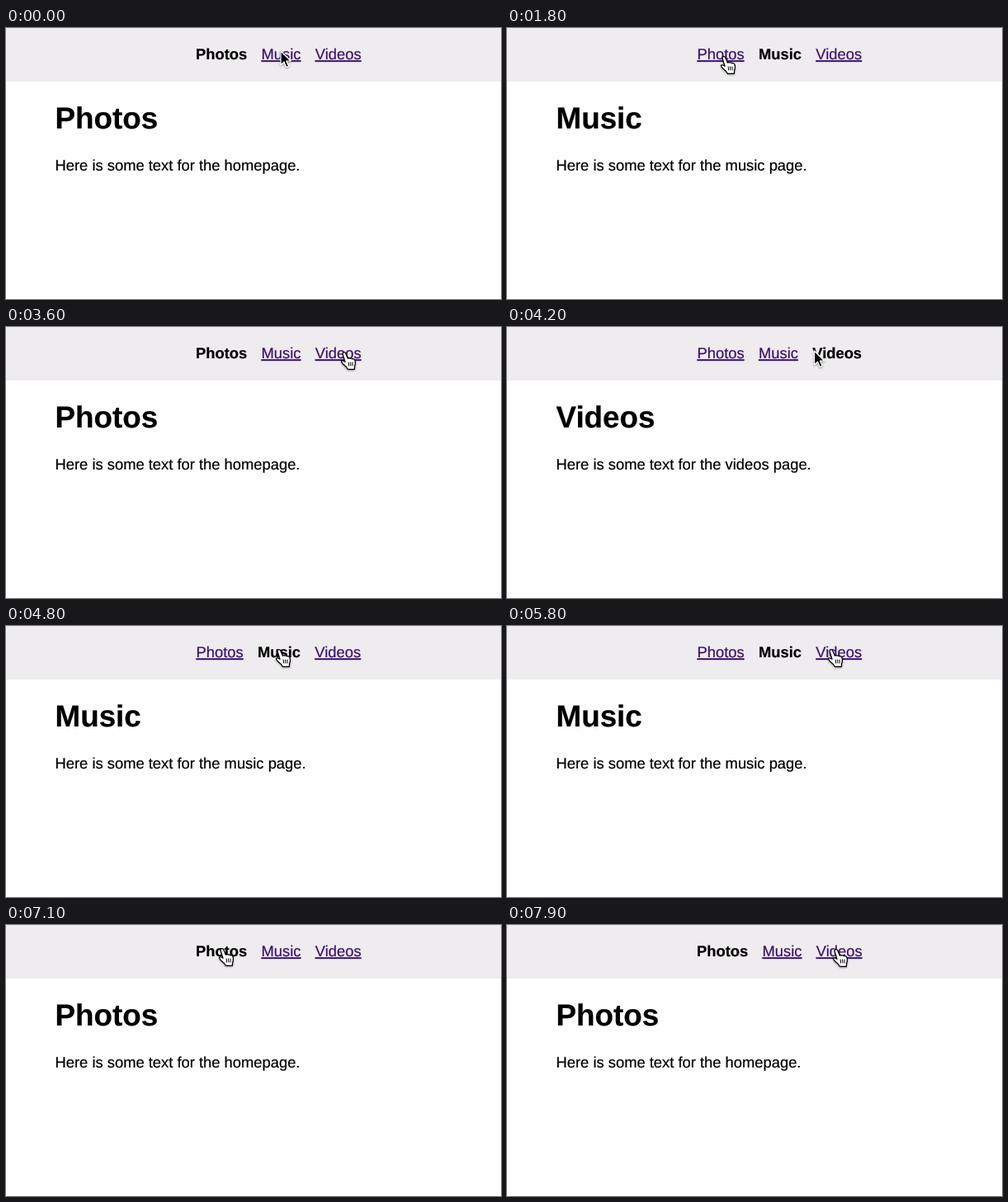
An HTML page for the animation above (8 s loop, 600 px wide and 329 px high).

```html
<!DOCTYPE html>
<html lang="en">
<head>
<meta charset="utf-8">
<title>Page navigation</title>
<style>
  html, body { margin: 0; width: 100%; height: 100%; overflow: hidden; background: #fefdff; }
  svg { display: block; width: 100%; height: 100%; }
  text {
    font: 18.38px "Liberation Sans", Arial, sans-serif;
    text-rendering: geometricPrecision;
    stroke: #000; stroke-width: .2px;
  }
  #title { font-size: 36.8px; font-weight: bold; }
  .link { fill: #3b0f70; stroke: #3b0f70; text-decoration: underline 1px; }
  .current { font-weight: bold; }
  #cursor { filter: drop-shadow(0 1.2px 1.2px rgba(0, 0, 0, .4)); }
</style>
</head>
<body>
<svg viewBox="0 0 600 329">
  <rect width="600" height="65" fill="#eeecee"/>
  <text id="nav" x="330.3" y="38.2" text-anchor="middle"><tspan>Photos</tspan><tspan dx="17.3">Music</tspan><tspan dx="17.3">Videos</tspan></text>
  <text id="title" x="59.5" y="122"></text>
  <text id="body" x="59.5" y="173"></text>
  <g id="cursor" stroke-linejoin="round" stroke-linecap="round">
    <path id="arrow" fill="#000" stroke="#fff" stroke-width="1.3"
      d="M7 0v17l4 -3.7l2.6 6.3l3.1 -1.3l-2.7 -6.1h5.3z"/>
    <g id="hand" fill="#fff" stroke="#000" stroke-width="1.25">
      <path d="M3 2.6Q3.2 .6 5 .7Q6.3 .8 7 2.4L9.4 8.2Q10.8 6.9 12 8.2Q13.6 7.2 14.8 8.8Q17 8.2 18 10.5Q19 14 17.6 17.4L17.4 21.3H9.4Q7.6 18.2 4.2 15.6Q1 12.4 1.6 11.2Q3.2 10 6 12.3Z"/>
      <path stroke-width="1" d="M10.2 13l.4 4M12.6 13l.3 4M15 13l.1 4"/>
    </g>
  </g>
</svg>
<script>
const LOOP = 8000, STEP = 100, HOVER = 1100;
const $ = id => document.getElementById(id);
const names = ["Photos", "Music", "Videos"];
const places = ["homepage", "music page", "videos page"];

// Each click opens the link under the pointer.
const clicks = [1300, 2100, 3700, 4700, 6000, 6900];

// Pointer moves: start, end, and where it comes to rest.
const home = [326, 28];
const moves = [
  [1600, 1800, 258, 34],
  [2200, 2500, 326, 30],
  [2700, 3000, 405, 30],
  [3900, 4500, 326, 28],
  [5500, 5800, 388, 28],
  [6200, 6800, 257, 28],
  [7200, 7900, 394, 29]
];

const ease = u => u * u * (3 - 2 * u);
const clamp = u => Math.min(1, Math.max(0, u));

function pointerAt(t) {
  let [x, y] = home;
  for (const [start, end, toX, toY] of moves) {
    const e = ease(clamp((t - start) / (end - start)));
    x += (toX - x) * e;
    y += (toY - y) * e;
  }
  return [x, y];
}

function pageAt(t) {
  const last = clicks.filter(c => c <= t).pop();
  if (!last) return 0;
  const [x] = pointerAt(last);
  return x < 290 ? 0 : x < 360 ? 1 : 2;
}

let shown = -1;
function showPage(page) {
  if (page === shown) return;
  shown = page;
  [...$("nav").children].forEach((item, i) => {
    item.setAttribute("class", i === page ? "current" : "link");
  });
  $("title").textContent = names[page];
  $("body").textContent = `Here is some text for the ${places[page]}.`;
}

function draw(now) {
  const t = Math.floor(now % LOOP / STEP) * STEP;
  showPage(pageAt(t));

  const [x, y] = pointerAt(t), tip = x + 5;
  const between = (tip > 291 && tip < 305) || (tip > 358 && tip < 374);
  const arrow = t < HOVER || between;
  $("arrow").style.display = arrow ? "" : "none";
  $("hand").style.display = arrow ? "none" : "";
  $("cursor").setAttribute("transform", `translate(${x} ${y})`);
}

const start = performance.now();
function tick() {
  draw(performance.now() - start);
  requestAnimationFrame(tick);
}
tick();
</script>
</body>
</html>
```
